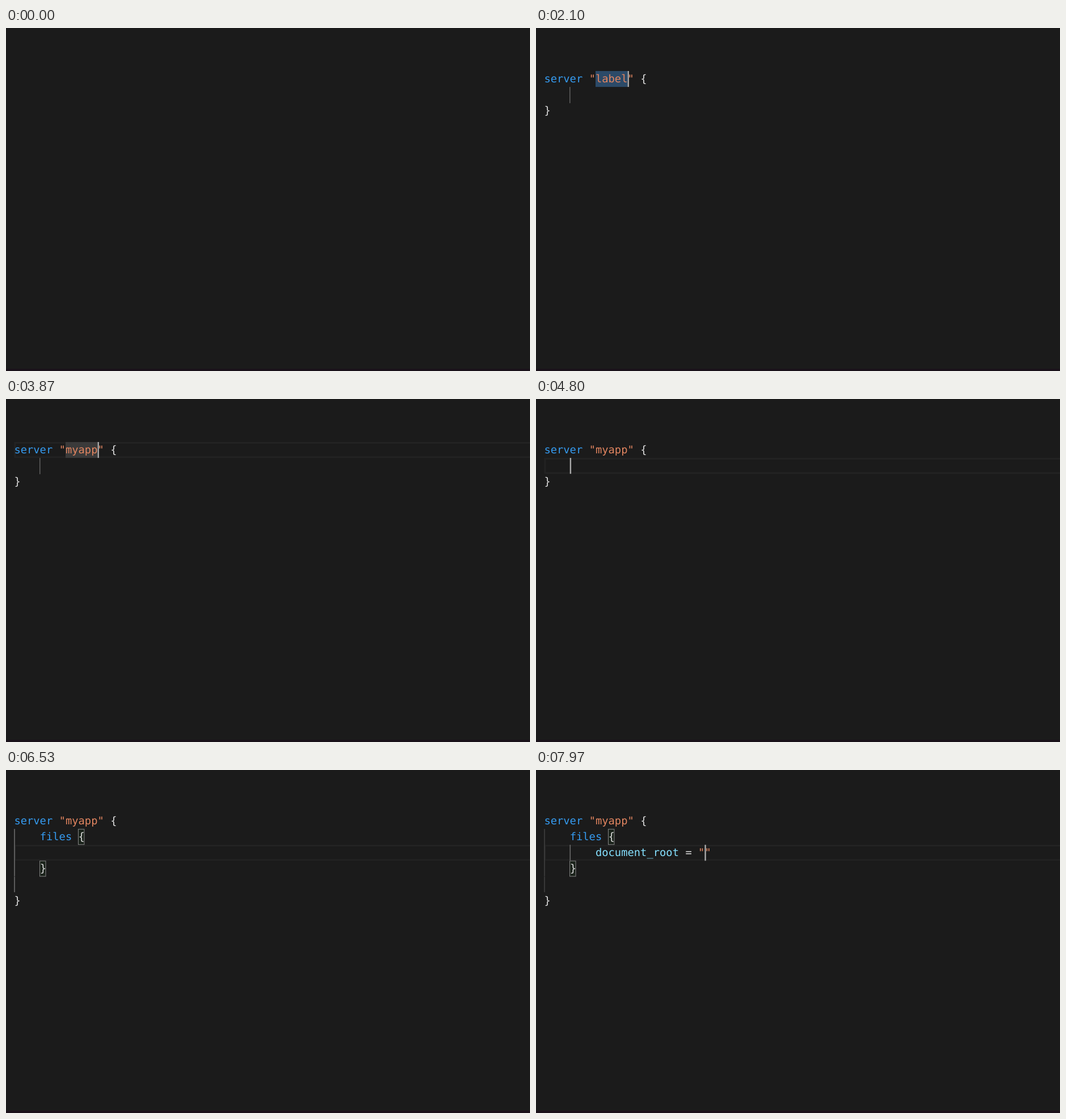
Write an HTML page that moves like this. It is 924 px wide and 606 px high and loops after 8000 ms.

```html
<!DOCTYPE html>
<html lang="en">
<head>
<meta charset="utf-8">
<title>Editor completion</title>
<style>
  html, body { margin: 0; width: 100%; height: 100%; overflow: hidden; background: #1b1b1b; }
  svg { display: block; }
  text { font: 18.8px "DejaVu Sans Mono", monospace; white-space: pre; text-rendering: geometricPrecision; }
  .icon { fill: none; stroke: #c8c8c8; stroke-width: 1.6; stroke-linejoin: round; }
</style>
</head>
<body>
<svg id="stage" width="924" height="606" viewBox="0 0 924 606">
  <rect y="602" width="924" height="4" fill="#1a121a"/>
</svg>
<script>
const DURATION = 8000, LEFT = 14.4, TOP = 76, CHAR = 11.32, LINE = 28.1;
const COLORS = { keyword: '#359bf0', string: '#e28560', attribute: '#85e0ff', plain: '#dcdcdc' };

const colX = col => LEFT + col * CHAR;
const lineY = line => TOP + line * LINE;
const rect = (x, y, w, h, fill, extra = '') =>
  `<rect x="${x}" y="${y}" width="${w}" height="${h}" fill="${fill}" ${extra}/>`;
const text = (x, y, fill, content, extra = '') =>
  `<text x="${x}" y="${y}" fill="${fill}" ${extra}>${content}</text>`;

const server = (label, ...body) => [`server "${label}" {`, ...(body.length ? body : ['']), '}'];
const files = line => server('myapp', '    files {', line, '    }', '');

const item = (label, detail) => ({ label, detail });
const serverItems = [item('server {…}', 'Block'), item('settings {…}', 'Block')];
const filesItems = [item('files {…}', 'Block')];
const rootItem = item('document_root', 'Attribute');
const dItems = [item('disable_access_control', 'Attribute'), rootItem];

const popup = (items, typed) => ({ items, typed });
const guide = (col, from, to, active) => ({ col, from, to, active });
const label = (name, extra) =>
  ({ code: server(name), at: [0, 8 + name.length], held: name.length, lit: true, ...extra });

// Each step changes only the listed parts of the one before.
const steps = [
  [0, { code: [''], at: [0, 0], lit: true, mouse: true, brackets: [], guides: [] }],
  [270, { mouse: false }],
  [470, { lit: false }],
  [970, { lit: true }],
  [1300, { code: ['s'], at: [0, 1], popup: popup(serverItems, 1) }],
  [1770, { lit: false }],
  [2000, label('label', { popup: null, selected: true, finalStop: true })],
  [2500, { lit: false }],
  [2830, label('m', { selected: false })],
  [3300, label('my')],
  [3400, label('mya')],
  [3700, label('myap')],
  [3870, label('myapp')],
  [4370, { lit: false }],
  [4800, { at: [1, 4], held: 0, finalStop: false, lit: true }],
  [4900, { brackets: [[0, 15], [2, 0]] }],
  [5300, { code: server('myapp', '    f'), at: [1, 5], popup: popup(filesItems, 1),
           guides: [guide(0, 1, 2, true)] }],
  [5500, { code: server('myapp', '    fi'), at: [1, 6], popup: popup(filesItems, 2) }],
  [6000, { code: files(''), at: [2, 8], popup: null, brackets: [],
           guides: [guide(0, 1, 4, true), guide(0, 4, 5, true)] }],
  [6100, { brackets: [[1, 10], [3, 4]] }],
  [6530, { lit: false }],
  [7000, { code: files('        d'), at: [2, 9], lit: true, popup: popup(dItems, 1),
           guides: [guide(0, 1, 4), guide(0, 4, 5), guide(4, 2, 3, true)] }],
  [7200, { code: files('        do'), at: [2, 10], popup: popup([rootItem], 2) }],
  [7600, { code: files('        document_root = ""'), at: [2, 25], popup: null }],
];

function tokenKind(token) {
  if (token[0] === '"') return 'string';
  if (token === 'server' || token === 'files') return 'keyword';
  return token === 'document_root' ? 'attribute' : 'plain';
}

function drawLine(code, line) {
  return [...code.matchAll(/"[^"]*"|\w+|\S/g)].map(m =>
    text(colX(m.index), lineY(line) + 20, COLORS[tokenKind(m[0])], m[0])).join('');
}

function drawIcon(x, y, kind) {
  const shape = kind === 'Block'
    ? 'M8 6h18.5q1.5 0 1.5 1.5v4q0 1.5-1.5 1.5h-18.5q-1.5 0-1.5-1.5v-4q0-1.5 1.5-1.5z' +
      'M8 17.5h4q1.3 0 1.3 1.3v4q0 1.3-1.3 1.3h-4q-1.3 0-1.3-1.3v-4q0-1.3 1.3-1.3z' +
      'M22.5 17.5h4q1.3 0 1.3 1.3v4q0 1.3-1.3 1.3h-4q-1.3 0-1.3-1.3v-4q0-1.3 1.3-1.3z'
    : 'M24 5.5a6 6 0 0 0-7.500 7.500l-9 8.500a2 2 0 0 0 3 3l8.500-9a6 6 0 0 0 7.500-7.500l-4 3.500-2.500-2.500z';
  return `<path class="icon" transform="translate(${x} ${y})" d="${shape}"/>`;
}

function drawPopup({ items, typed }, [line, col]) {
  const x = colX(col) - 0.4, top = lineY(line + 1), width = 672;
  const rows = items.map(({ label, detail }, i) => {
    const y = top + i * LINE, base = y + 20.8;
    const match = `<tspan fill="#0a8cf5" font-weight="bold">${label.slice(0, typed)}</tspan>`;
    return (i ? '' : rect(x, y, width, LINE, '#002640')) +
      drawIcon(x, y, detail) +
      text(x + 36.5, base, '#dcdcdc', match + label.slice(typed)) +
      (i ? '' : text(x + width - 16, base, '#8b959c', detail, 'text-anchor="end"'));
  });
  const height = items.length * LINE + 0.4;
  return rect(x, top, width, height, '#202020') + rows.join('') +
    rect(x + 0.5, top + 0.5, width - 1, height - 1, 'none', 'stroke="#414548"');
}

function drawScene(s) {
  const [line, col] = s.at, y = lineY(line);
  const parts = [];
  if (!s.selected)
    parts.push(rect(LEFT + 1.4, y + 1.4, 960, LINE - 2.8, 'none', 'stroke="#232323" stroke-width="2.8"'));
  if (s.held)
    parts.push(rect(colX(8), y, s.held * CHAR, LINE, s.selected ? '#2c4a68' : '#3a3a3a'));
  for (const g of s.guides)
    parts.push(rect(colX(g.col) - 0.2, lineY(g.from), 1.6, (g.to - g.from) * LINE - 0.6,
      g.active ? '#6c6c6c' : '#404040'));
  for (const [l, c] of s.brackets)
    parts.push(rect(colX(c) - 0.1, lineY(l) + 0.5, CHAR - 0.9, LINE - 1, '#1a221a', 'stroke="#858585"'));
  if (s.finalStop) parts.push(rect(colX(4) - 0.7, lineY(1), 1.6, LINE + 0.6, '#5c5c5c'));
  parts.push(...s.code.map(drawLine));
  if (s.lit) parts.push(rect(colX(col), y, 2.4, LINE, '#aaaaaa'));
  if (s.popup) parts.push(drawPopup(s.popup, s.at));
  if (s.mouse)
    parts.push('<path d="M913.5 595q3 0 3.500 2q.5-2 3.500-2M917 597v9M914.500 602.500h5" fill="none" stroke="#d8d8d8" stroke-width="1.3"/>');
  return parts.join('');
}

const stage = document.getElementById('stage');
let state = {};
steps.forEach(([time, change], i) => {
  state = { ...state, ...change };
  const scene = document.createElementNS('http://www.w3.org/2000/svg', 'g');
  scene.innerHTML = drawScene(state);
  stage.append(scene);
  const end = i + 1 < steps.length ? steps[i + 1][0] : DURATION;
  scene.animate([[0, 0], [time, 1], [end, 0], [DURATION, 0]].map(([at, opacity]) =>
    ({ offset: at / DURATION, opacity, easing: 'steps(1, end)' })),
    { duration: DURATION, iterations: Infinity });
});
</script>
</body>
</html>
```
